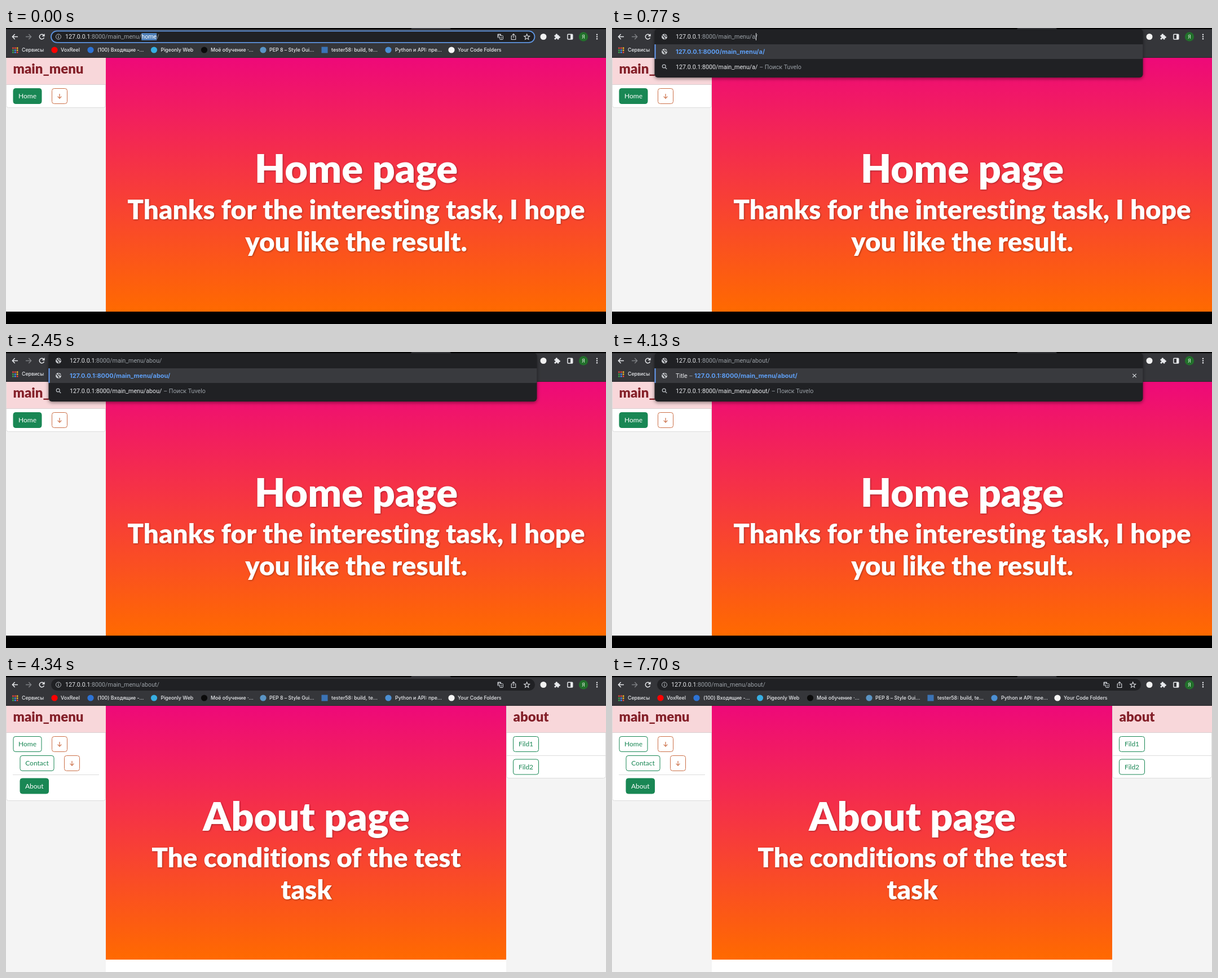
Animation, 1064 px wide and 526 px high, one loop 8000 ms. Source, as an HTML page with a canvas:

```html
<!DOCTYPE html>
<html lang="en">
<head>
<meta charset="utf-8">
<title>Menu demo</title>
<style>
  html, body { margin: 0; width: 100%; height: 100%; overflow: hidden; background: #000; }
  canvas { display: block; width: 1064px; height: 526px; }
</style>
</head>
<body>
<canvas id="stage"></canvas>
<script>
const W = 1064, H = 526, LOOP = 8000;
const canvas = document.getElementById('stage');
const ctx = canvas.getContext('2d');
const dpr = window.devicePixelRatio || 1;
canvas.width = W * dpr;
canvas.height = H * dpr;

const UI = 'Inter, Roboto, sans-serif';
const PAGE = 'Lato, "Open Sans", sans-serif';
const URL_FONT = '10.7px Roboto, Inter, sans-serif';
const BOLD_URL = `700 10.95px ${UI}`;
const HOST = '127.0.0.1';
const PATH = ':8000/main_menu/';

const BAR = '#35363a', FIELD = '#202124', LIGHT = '#e8eaed', DIM = '#9aa0a6';
const GREEN = '#198754', RUST = '#cb7048';

const CLOSE_AT = 4200, LOADED_AT = 4340;
const TYPED = [[700, 'a'], [1050, 'ab'], [1680, 'abo'], [1960, 'abou'], [3360, 'about']];
const CARET_OFF = [[1470, 1680], [2450, 3010], [3780, 4200]];

const BOOKMARKS = [
  [97, 'VoxReel', 86, '#ff0000'],
  [162, '(100) Входящие -...', 150, '#2d73d5'],
  [274.5, 'Pigeonly Web', 262.5, '#37aee2'],
  [363, 'Моё обучение ·...', 351.5, '#0b0b0b'],
  [467, 'PEP 8 – Style Gui...', 456, '#5a94c4'],
  [577, 'tester58: build, te...', 565, '#3b73b5', true],
  [690, 'Python и API: пре...', 678, '#4b8fd3'],
  [801, 'Your Code Folders', 790, '#f5f5f5']
];

function rect(x, y, w, h, color) {
  ctx.fillStyle = color;
  ctx.fillRect(x, y, w, h);
}

function box(x, y, w, h, r, fill, stroke, line = 1) {
  ctx.beginPath();
  ctx.roundRect(x, y, w, h, r);
  if (fill) { ctx.fillStyle = fill; ctx.fill(); }
  if (stroke) { ctx.strokeStyle = stroke; ctx.lineWidth = line; ctx.stroke(); }
}

function disc(x, y, r, fill) {
  ctx.beginPath();
  ctx.arc(x, y, r, 0, Math.PI * 2);
  ctx.fillStyle = fill;
  ctx.fill();
}

function ring(x, y, r, color, line = 1) {
  ctx.beginPath();
  ctx.arc(x, y, r, 0, Math.PI * 2);
  ctx.strokeStyle = color;
  ctx.lineWidth = line;
  ctx.stroke();
}

function path(d, color, line = 1.3, x = 0, y = 0) {
  ctx.save();
  ctx.translate(x, y);
  ctx.strokeStyle = color;
  ctx.lineWidth = line;
  ctx.stroke(new Path2D(d));
  ctx.restore();
}

// Draws text and returns the x where it ends.
function text(str, x, y, font, color, align = 'left') {
  ctx.font = font;
  ctx.fillStyle = color;
  ctx.textAlign = align;
  ctx.fillText(str, x, y);
  return x + ctx.measureText(str).width;
}

function cross(x, y, r, color, line) {
  path(`M${-r} ${-r}L${r} ${r}M${r} ${-r}L${-r} ${r}`, color, line, x, y);
}

/* ---------- web page ---------- */

function button(label, x, y, w, filled) {
  box(x + .5, y + .5, w - 1, 27, 4, filled ? GREEN : '#fff', GREEN);
  text(label, x + w / 2, y + 18, `12px ${PAGE}`, filled ? '#fff' : GREEN, 'center');
}

function arrowButton(x, y, focused) {
  if (focused) box(x - .5, y - .5, 29, 29, 5, null, '#dcc4b6', 2);
  box(x + .5, y + .5, 27, 27, 4, '#fff', focused ? '#b0704e' : RUST);
  path('M0 -4V4M-3.4 .7L0 4.1L3.4 .7', RUST, 1.2, x + 14, y + 14);
}

function card(x, title, bottom) {
  box(x + .5, 53.5, 176, bottom - 53, [0, 0, 4, 4], '#fff', '#dcdcdc');
  rect(x + 1, 53, 176, 47, '#f8d7da');
  rect(x, 100, 177, 1, '#d9cfd0');
  text(title, x + 12.5, 80.5, `900 24px ${PAGE}`, '#842029');
}

function hero(x, w, lines) {
  const sky = ctx.createLinearGradient(0, 53, 0, 504);
  sky.addColorStop(0, '#ee0979');
  sky.addColorStop(1, '#ff6a00');
  rect(x, 53, w, 451, sky);
  ctx.save();
  ctx.letterSpacing = '0.01px'; // any spacing turns ligatures off
  ctx.shadowColor = 'rgba(0,0,0,.35)';
  ctx.shadowBlur = 3 * dpr;
  ctx.shadowOffsetX = ctx.shadowOffsetY = dpr;
  lines.forEach((line, i) => {
    text(line, x + w / 2 + .5, [275, 340, 397][i], `900 ${i ? 47.6 : 70.4}px ${PAGE}`, '#fff', 'center');
  });
  ctx.restore();
}

function homePage(focused) {
  rect(0, 53, 177, 451, '#f4f4f4');
  card(0, 'main_menu', 141);
  button('Home', 12.5, 107, 51, true);
  arrowButton(81, 107, focused);
  hero(177, W - 177, ['Home page', 'Thanks for the interesting task, I hope', 'you like the result.']);
}

function aboutPage() {
  rect(0, 53, W, H - 53, '#f4f4f4');
  rect(177, 504, 710, 22, '#fff');
  card(0, 'main_menu', 221);
  button('Home', 12.5, 107, 51);
  arrowButton(81, 107);
  button('Contact', 24.5, 141, 61);
  arrowButton(103, 141);
  rect(12, 175, 153, 1, '#dcdcdc');
  button('About', 24.5, 181.5, 51.5, true);
  card(887, 'about', 181);
  rect(887, 141, 177, 1, '#dcdcdc');
  button('Fild1', 899, 107, 46);
  button('Fild2', 899, 147.5, 46);
  hero(177, 710, ['About page', 'The conditions of the test', 'task']);
}

/* ---------- browser ---------- */

function globe(x, y) {
  disc(x, y, 5, '#c4c7cb');
  path('M-4 -2L-1.5 -1L-.8 1L1 2.2L.3 4.3M.5 -4.4L.8 -2L3 -.8L4.6 -1.4', FIELD, 1.3, x, y);
}

function infoIcon(x, y) {
  ring(x, y, 4.5, '#bdc1c6');
  rect(x - .6, y - .6, 1.2, 3.2, '#bdc1c6');
  rect(x - .6, y - 2.6, 1.2, 1.2, '#bdc1c6');
}

function star(x, y) {
  ctx.beginPath();
  for (let i = 0; i < 10; i++) {
    const r = i % 2 ? 2.3 : 5.2, a = i * Math.PI / 5 - Math.PI / 2;
    ctx.lineTo(x + r * Math.cos(a), y + r * Math.sin(a));
  }
  ctx.closePath();
  ctx.strokeStyle = '#d5d8dc';
  ctx.lineWidth = 1.1;
  ctx.stroke();
}

function fieldIcons(withTranslate) {
  if (withTranslate) {
    box(871.5, 10.5, 6.5, 7, 1, '#bdc1c6');
    box(875.5, 13.5, 6, 7, 1, FIELD, '#bdc1c6');
    text('A', 874.7, 16.5, `700 6px ${UI}`, FIELD, 'center');
    text('文', 878.5, 19, '5px "Noto Sans CJK SC", "Noto Sans CJK", sans-serif', '#bdc1c6', 'center');
  }
  path('M-2 -1.5H-3.8V5H3.8V-1.5H2M0 2V-5M-2.3 -2.8L0 -5L2.3 -2.8', '#d5d8dc', 1.1, 900, 15.5);
  star(923.7, 16);
}

function toolbarIcons(loading) {
  path('M5 0H-4.5M-.3 -4.4L-4.6 0L-.3 4.4', LIGHT, 1.5, 16, 15.5);
  path('M-5 0H4.5M.3 -4.4L4.6 0L.3 4.4', '#7d7f83', 1.5, 40, 15.5);
  if (loading) {
    cross(63.5, 15.5, 4.2, LIGHT, 1.6);
  } else {
    ctx.beginPath();
    ctx.arc(63.5, 15.5, 4.2, .35, Math.PI * 1.78);
    ctx.strokeStyle = LIGHT;
    ctx.lineWidth = 1.5;
    ctx.stroke();
    ctx.fillStyle = LIGHT;
    ctx.fill(new Path2D('M68.6 10V15H63.6Z'));
  }

  disc(953, 15.5, 5.5, '#f1f1f1');

  box(972.5, 12.5, 8, 8, 1, LIGHT);
  disc(976.3, 12, 1.8, LIGHT);
  disc(981, 16.3, 1.8, LIGHT);
  disc(973, 16.6, 1.3, BAR);
  disc(976.5, 20, 1.3, BAR);

  box(995.8, 11.2, 9, 8.8, 1, null, LIGHT, 1.4);
  rect(1001, 11, 4, 9, LIGHT);
  disc(1024, 15.5, 8.2, '#22702b');
  text('Я', 1024, 18.6, `8.5px ${UI}`, '#e6efe6', 'center');
  for (const y of [11.7, 15.5, 19.3]) disc(1048, y, 1.2, LIGHT);
}

function bookmarkBar() {
  const font = `500 8.8px ${UI}`;
  const dots = ['#e8453c', '#e8453c', '#f5b928', '#38a853', '#4688f1', '#f5b928', '#38a853', '#4688f1', '#e8453c'];
  dots.forEach((c, i) => rect(11.2 + (i % 3) * 3.8, 34.4 + Math.floor(i / 3) * 3.8, 2.6, 2.6, c));
  text('Сервисы', 28, 42, font, LIGHT);
  for (const [x, label, iconX, color, square] of BOOKMARKS) {
    if (square) rect(iconX - 5.5, 33.5, 11, 11, color);
    else disc(iconX, 39, 5.6, color);
    text(label, x, 42, font, LIGHT);
  }
}

function address(x, rest) {
  const end = text(HOST, x, 19, URL_FONT, LIGHT);
  return text(PATH + rest, end, 19, URL_FONT, DIM);
}

function addressField(focused, loading) {
  box(80, 5, 858, 21, 10.5, FIELD);
  infoIcon(93, 15.5);
  if (focused) {
    box(80, 5.3, 857.5, 20.6, 10.3, null, '#5f95e0', 1.8);
    const start = address(105, '');
    rect(start, 9, ctx.measureText('home').width, 13, '#4f7fb8');
    const end = text('home', start, 19, URL_FONT, '#fff');
    text('/', end, 19, URL_FONT, DIM);
  } else {
    address(105, 'about/');
  }
  fieldIcons(!loading);
}

function suggestions(t, word) {
  const url = `${HOST}${PATH}${word}/`;
  ctx.save();
  ctx.shadowColor = 'rgba(0,0,0,.45)';
  ctx.shadowBlur = 6 * dpr;
  ctx.shadowOffsetY = 2 * dpr;
  box(75.5, 2, 866, 86, [5, 5, 6, 6], FIELD);
  ctx.restore();

  rect(75.5, 29, 866, 26, '#393a3e');
  rect(75.5, 29, 2, 26, '#669df6');
  globe(93, 15.5);
  globe(93, 42);
  ring(92.2, 68, 2.9, '#bdc1c6', 1.2);
  path('M94.3 70.1L97.2 73', '#bdc1c6', 1.3);

  address(113, word + '/');
  if (!CARET_OFF.some(([from, to]) => t >= from && t < to)) {
    const x = 113 + ctx.measureText(HOST).width + ctx.measureText(PATH + word).width;
    rect(Math.round(x) + 1, 9, 1, 13, LIGHT);
  }

  let x = 113;
  if (word === 'about') {
    x = text('Title', x, 46, URL_FONT, LIGHT);
    x = text(' – ', x, 46, URL_FONT, DIM);
    cross(926.5, 42, 3.2, '#d5d8dc', 1.2);
  }
  text(url, x, 46, BOLD_URL, '#5e9ff5');
  x = text(url, 113, 72.5, URL_FONT, LIGHT);
  text(' – Поиск Tuvelo', x, 72.5, URL_FONT, DIM);
}

function draw(t) {
  const step = TYPED.filter(([at]) => t >= at).pop();
  const open = step && t < CLOSE_AT;
  const loaded = t >= LOADED_AT;
  const loading = t >= CLOSE_AT && !loaded;

  ctx.setTransform(dpr, 0, 0, dpr, 0, 0);
  rect(0, 0, W, H, '#000');
  if (loaded) aboutPage();
  else homePage(loading);

  rect(0, 2, W, 51, BAR);
  box(718, 0, 71, 4, [3, 3, 0, 0], BAR);
  rect(0, 52, W, 1, '#28292c');
  toolbarIcons(loading);
  bookmarkBar();
  if (open) suggestions(t, step[1]);
  else addressField(!step, loading);
}

const began = performance.now();
function tick() {
  draw((performance.now() - began) % LOOP);
  requestAnimationFrame(tick);
}
tick();
</script>
</body>
</html>
```
